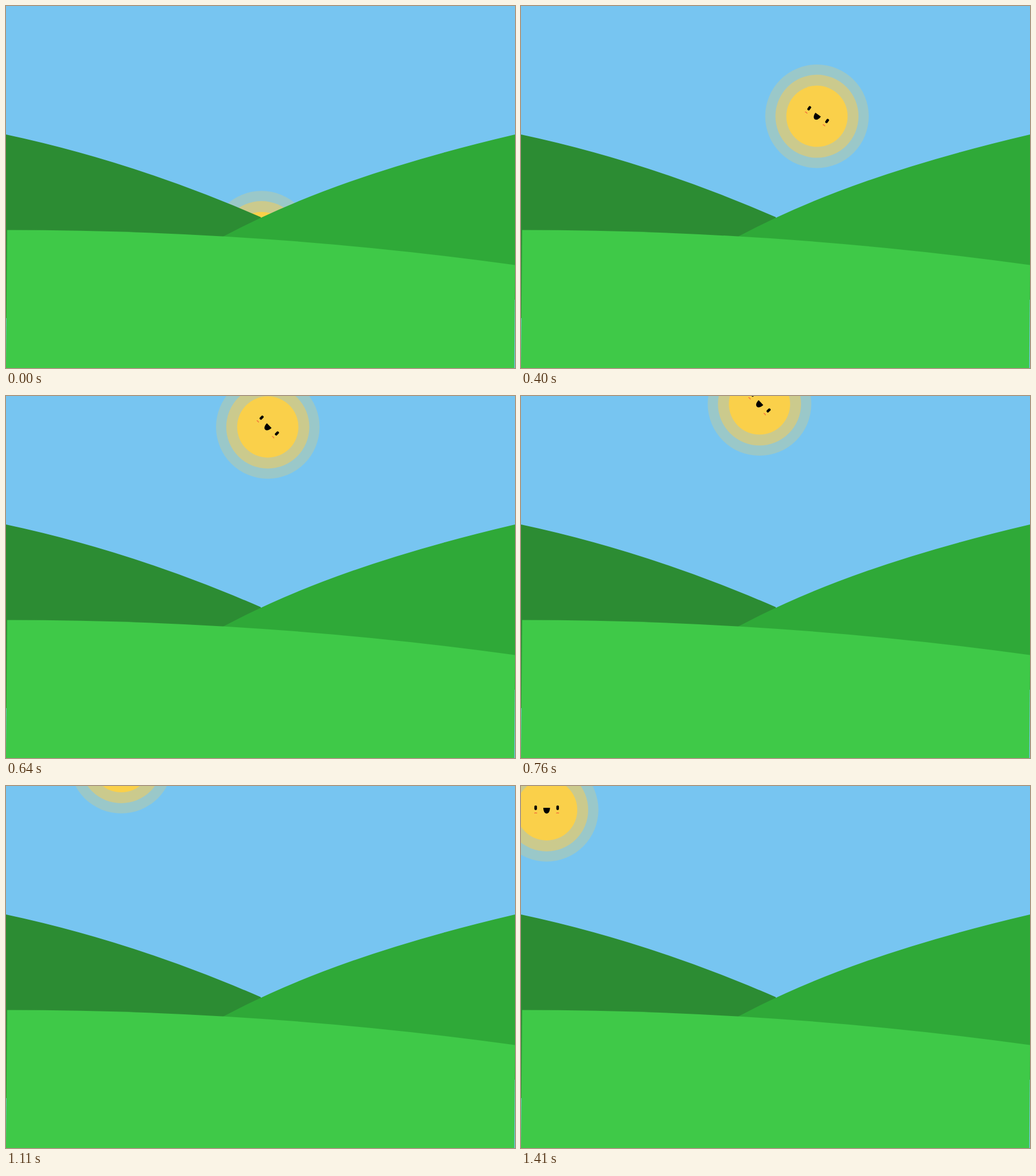
These frames come from a looping animation (887 by 631 pixels, 2.13 s). An HTML page:

```html
<!DOCTYPE html>
<html lang="en">
<head>
<meta charset="utf-8">
<title>Sunrise</title>
<style>
  html, body { margin: 0; height: 100%; overflow: hidden; background: #77c5f1; }
  svg { display: block; width: 887px; height: 631px; }
</style>
</head>
<body>
<svg viewBox="0 0 887 631">
  <g id="sun">
    <circle r="90.2" fill="#9ac8c9"/>
    <circle r="72.4" fill="#cbca8d"/>
    <circle r="53.4" fill="#fad04a"/>
    <g id="face">
      <rect x="-21.4" y="-7.6" width="4.5" height="8" rx="1.8"/>
      <rect x="16.9" y="-7.6" width="4.5" height="8" rx="1.8"/>
      <path d="M-5.8-3.5H5.8C5.8 2.5 3.4 6.5 0 6.5S-5.8 2.5-5.8-3.5Z"/>
      <path d="M-21.5 5.9q2.4-1.3 4.8 0M16.7 5.9q2.4-1.3 4.8 0" fill="none" stroke="#f4743b" stroke-width="1.5"/>
    </g>
  </g>
  <path fill="#2c8c33" d="M0 224Q222 271.3 444 368V544H0Z"/>
  <path fill="#2fa938" d="M887 224Q727 261.5 600 306Q480 348 380 401L360 411.5V512H887Z"/>
  <path fill="#3fc948" d="M2 390.5Q444.5 390.5 887 451.5L885.7 631H0Z"/>
</svg>
<script>
  const LOOP = 2130, LAST_STEP = 46, DEG = Math.PI / 180;
  const sun = document.getElementById('sun');
  const face = document.getElementById('face');

  // Steps last 30 ms, with an occasional 40 ms one
  const stepStart = k => 30 * k + 10 * Math.floor((k + 8) / 14.6);

  function draw(now) {
    const t = now % LOOP;
    let step = 0;
    while (step < LAST_STEP && stepStart(step + 1) <= t) step++;

    // Half a circle at constant speed, tilting the face on the way
    const turn = Math.min(180, Math.max(0, 4 * (step - 0.47)));
    const angle = (42.8 - turn) * DEG;
    const x = 245 + 273 * Math.cos(angle);
    const y = 227 + 273 * Math.sin(angle);
    sun.setAttribute('transform', `translate(${x} ${y})`);
    face.setAttribute('transform', `rotate(${46.3 * Math.sin(turn * DEG)})`);
  }

  let start;
  function tick(now) {
    start ??= now;
    draw(now - start);
    requestAnimationFrame(tick);
  }
  draw(0);
  requestAnimationFrame(tick);
</script>
</body>
</html>
```
